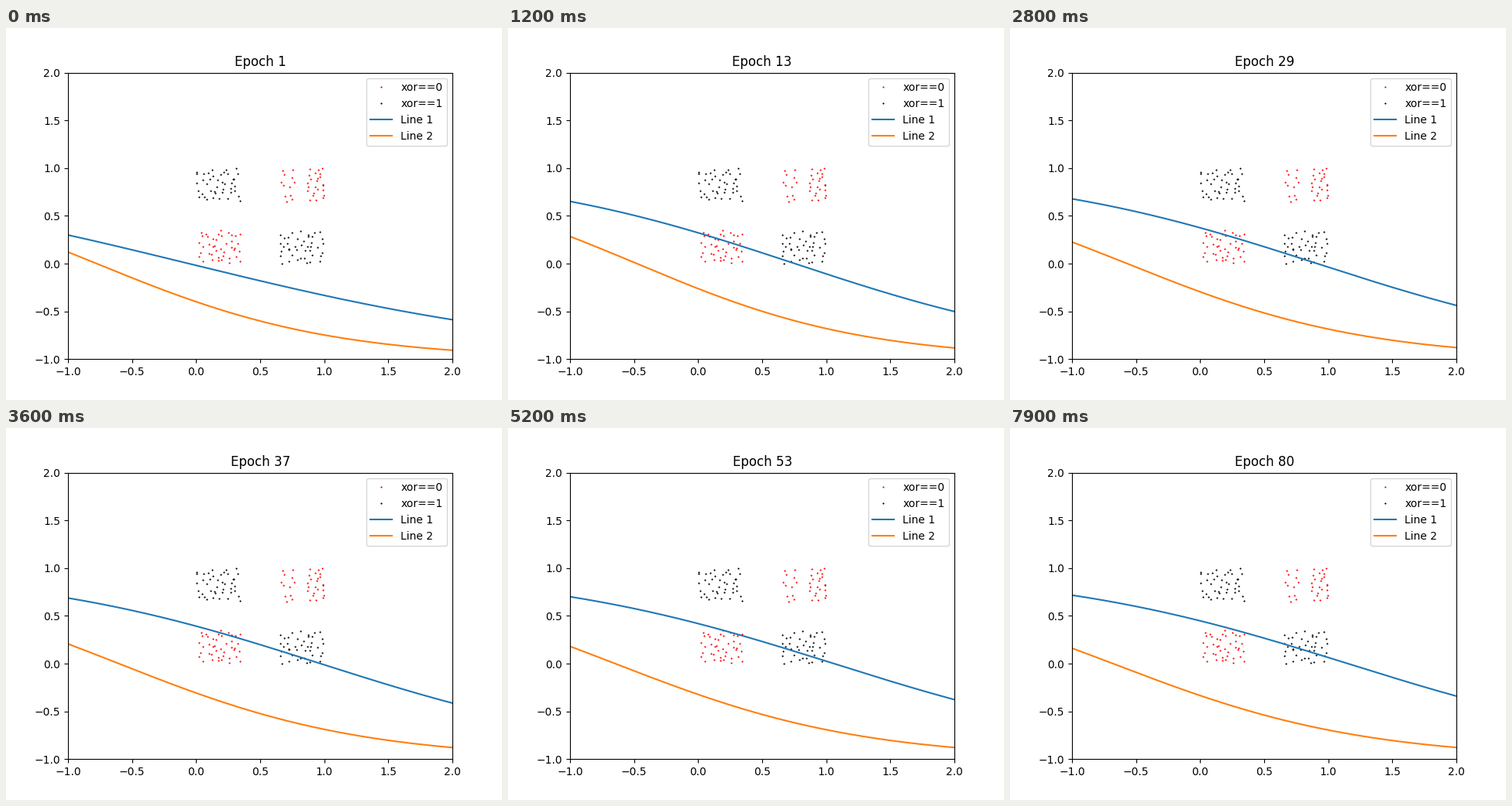
Animation, 640 px wide and 480 px high, one loop 8000 ms. Source, as a matplotlib script:

```python
import numpy as np
import matplotlib.pyplot as plt
from matplotlib.animation import FuncAnimation

EPOCHS = 80
FAST = 3.3  # decay of the first quick adjustment, in epochs
rng = np.random.default_rng(7)


def scatter_box(x0, x1, y0, y1, cols, rows):
    """One random point in every cell of a cols x rows grid."""
    i, j = np.meshgrid(np.arange(cols), np.arange(rows))
    u = (i + rng.random(i.shape)) / cols
    v = (j + rng.random(j.shape)) / rows
    return np.column_stack([(x0 + (x1 - x0) * u).ravel(),
                            (y0 + (y1 - y0) * v).ravel()])


low, high = (0, .35), (.65, 1)
xor0 = np.vstack([scatter_box(.02, .35, *low, 6, 7),
                  scatter_box(.66, .77, *high, 2, 6),
                  scatter_box(.87, 1, *high, 3, 8)])
xor1 = np.vstack([scatter_box(*low, *high, 6, 7),
                  scatter_box(*high, 0, .34, 6, 7)])

# Each unit's input at x = -1 and x = 2: (limit, slow part, slow decay, fast part)
unit1 = (.970, -.214, 70, -.447), (-.314, -.325, 38, -.035)
unit2 = (.153, .237, 25, -.268), (-1.370, -.050, 12, -.093)
x = np.linspace(-1, 2, 200)


def settle(t, limit, slow, decay, fast):
    return limit + slow * np.exp(-t / decay) + fast * np.exp(-t / FAST)


def curve(unit, t):
    left, right = (settle(t, *end) for end in unit)
    return np.tanh(left + (right - left) * (x + 1) / 3)


fig, ax = plt.subplots(figsize=(6.4, 4.8), dpi=100)
dot = dict(marker='.', ls='', ms=2, mew=.5)
ax.plot(*xor0.T, color='r', label='xor==0', **dot)
ax.plot(*xor1.T, color='k', label='xor==1', **dot)
line1, = ax.plot(x, curve(unit1, 0), 'C0', label='Line 1')
line2, = ax.plot(x, curve(unit2, 0), 'C1', label='Line 2')
ax.set(xlim=(-1, 2), ylim=(-1, 2))
ax.legend(loc='upper right')
title = ax.set_title('Epoch 1')


def update(t):
    line1.set_ydata(curve(unit1, t))
    line2.set_ydata(curve(unit2, t))
    title.set_text(f'Epoch {t + 1}')
    return line1, line2, title


anim = FuncAnimation(fig, update, frames=EPOCHS, interval=100,
                     repeat=True, repeat_delay=0, blit=False)
plt.show()
```
